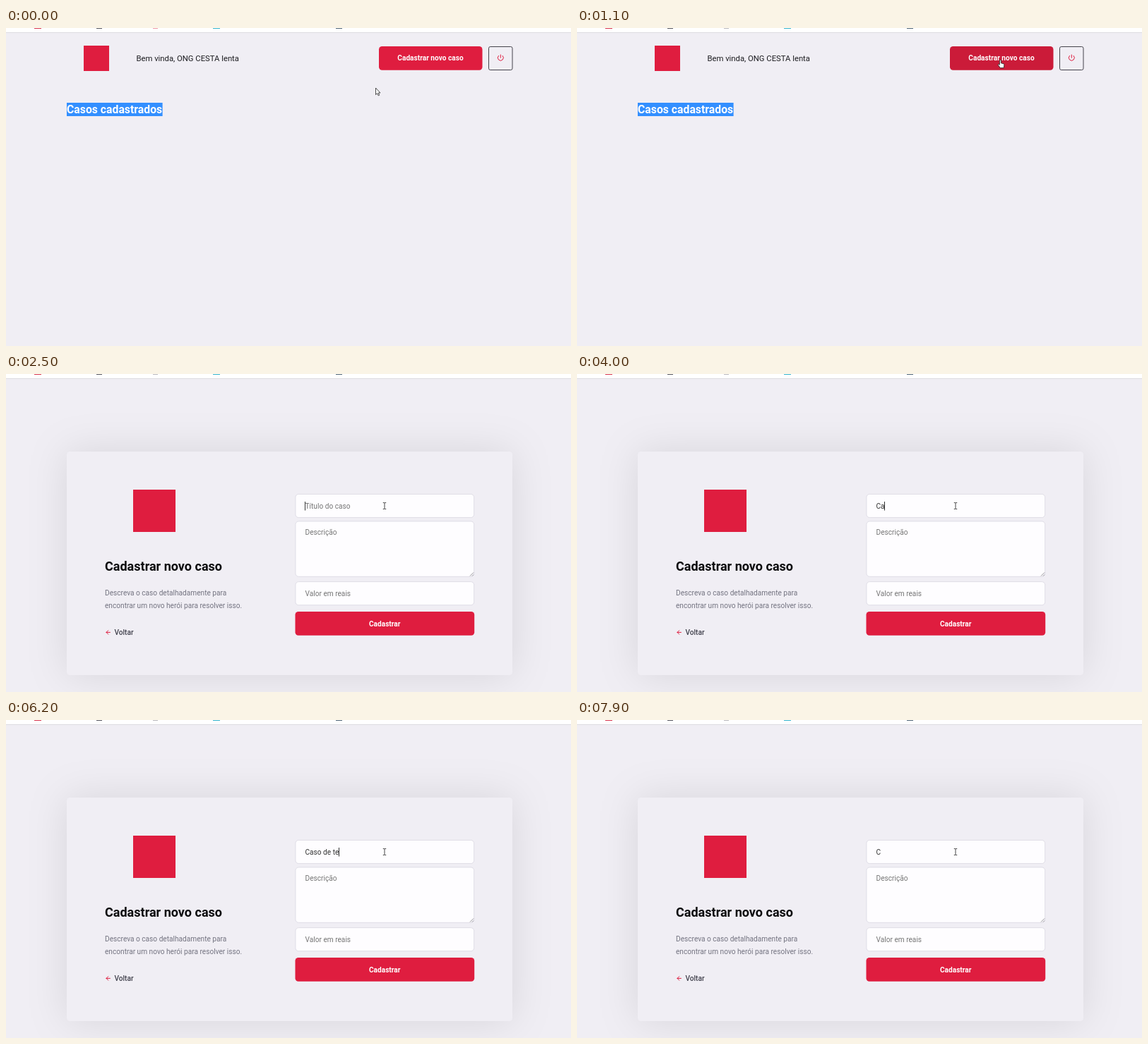
Write an HTML page that moves like this. It is 800 px wide and 451 px high and loops after 8 s.

```html
<!DOCTYPE html>
<html lang="pt-BR">
<head>
<meta charset="utf-8">
<title>Cadastrar novo caso</title>
<style>
  html, body { margin: 0; width: 100%; height: 100%; overflow: hidden; background: #f0eef4; }
  svg { display: block; width: 800px; height: 451px; }
  text { font: 10.14px Roboto, sans-serif; white-space: pre; }
  .card { filter: drop-shadow(0 0 28px rgba(0, 0, 0, .1)); }
  .field { fill: #fefdff; stroke: #dfdde6; }
  .hint { fill: #757575; }
  .muted { fill: #737380; }
  .bold { font-weight: 700; }
  .white { fill: #fff; }
  .mid { text-anchor: middle; }
  .brand { fill: #df1d3f; }
  .line { fill: none; stroke: #df1d3f; stroke-linecap: round; stroke-linejoin: round; }
  .pointer { fill: #fff; stroke: #222; stroke-width: .8; stroke-linejoin: round; }
</style>
</head>
<body>
<svg viewBox="0 0 800 451">
  <rect width="800" height="451" fill="#f0eef4"/>

  <g id="list">
    <rect class="brand" x="110" y="25" width="36" height="36"/>
    <text x="184.5" y="46.9" style="font-size:11.27px" fill="#1b1b1f">Bem vinda, ONG CESTA lenta</text>
    <rect id="create" x="528" y="26" width="146.5" height="33.8" rx="4.5"/>
    <text class="bold white mid" x="601" y="46.4">Cadastrar novo caso</text>
    <rect x="683.5" y="26.5" width="33.5" height="33" rx="2.3" fill="none" stroke="#44434c"/>
    <path class="line" d="M700.3 38v4.2M697.4 39.4a4 4 0 1 0 5.8 0"/>
    <rect x="86" y="106" width="135.6" height="19" fill="#338fff"/>
    <text class="bold white" x="86" y="121" style="font-size:15.78px">Casos cadastrados</text>
  </g>

  <g id="form">
    <rect x="86" y="110" width="631" height="317" rx="4.5" fill="#f0eef4"
      style="filter:none"/>
    <rect class="card" x="86" y="110" width="631" height="317" rx="4.5" fill="#f0eef4"/>
    <rect class="brand" x="180" y="164" width="60" height="60"/>
    <text class="bold" x="140" y="279" style="font-size:18.03px" fill="#0b0b0d">Cadastrar novo caso</text>
    <text class="muted" x="140" y="314">Descreva o caso detalhadamente para</text>
    <text class="muted" x="140" y="332">encontrar um novo herói para resolver isso.</text>
    <path class="line" d="M147.4 366.4h-5.4m2.7 -2.7l-2.7 2.7l2.7 2.7"/>
    <text x="153.4" y="370" style="font-weight:500" fill="#41414d">Voltar</text>

    <rect class="field" x="409.9" y="170.4" width="252.8" height="33.2" rx="4.5"/>
    <text id="title" x="423.5" y="190.6"></text>
    <rect id="caret" y="181" width="1" height="12.5" fill="#333"/>
    <rect class="field" x="409.9" y="208.9" width="252.8" height="78.4" rx="4.5"/>
    <text class="hint" x="423.5" y="228.4">Descrição</text>
    <path d="M657 286.5l5-5M660 286.5l2-2" stroke="#77757d" stroke-width=".8"/>
    <rect class="field" x="409.9" y="294.6" width="252.8" height="33.2" rx="4.5"/>
    <text class="hint" x="423.5" y="314.6">Valor em reais</text>
    <rect class="brand" x="409.5" y="337" width="253.7" height="33.8" rx="4.5"/>
    <text class="bold white mid" x="536.2" y="357.6">Cadastrar</text>
  </g>

  <!-- browser bar -->
  <rect width="800" height="6" fill="#fff"/>
  <rect y="6" width="800" height="1" fill="#dddce1"/>
  <rect x="40" width="10" height="1" fill="#d8364f"/>
  <rect x="128" width="8" height="1" fill="#55565f"/>
  <rect id="tab" x="208" width="7" height="1"/>
  <rect x="293" width="10" height="1" fill="#35b5cf"/>
  <rect x="467" width="9" height="1" fill="#4f6577"/>

  <g id="cursor">
    <path id="arrow" class="pointer" d="M.5 0v9.6l2.2-2 1.5 3.3 1.5-.7-1.5-3.2h2.8z"/>
    <path id="hand" class="pointer" d="M-.2 .8q1-1.2 2 0v4l3.6 .9q1 .3 .8 1.7l-.5 4.2h-5l-3.2-4.4q.2-1.2 1.4-.7l.9 .8z"/>
    <path id="beam" d="M-2.2 -4.5h1.6l.6 .5 .6-.5h1.6M0 -4v8M-2.2 4.5h1.6l.6-.5 .6 .5h1.6"
      fill="none" stroke="#333" stroke-width=".9"/>
  </g>
</svg>
<script>
const LOOP = 8000, OPEN = 1200, FOCUS = 1900, BLINK = 300;
const $ = id => document.getElementById(id);
const [list, form, create, title, caret, tab, cursor, arrow, hand, beam] =
  ['list', 'form', 'create', 'title', 'caret', 'tab', 'cursor', 'arrow', 'hand', 'beam'].map($);

// time, x, y
const path = [[100, 523, 85], [900, 598, 45], [1250, 599, 45], [1800, 536, 187]];
// time, number of letters typed
const phrase = 'Caso de te';
const keys = [[FOCUS, 0], [3700, 1], [3900, 2], [4100, 3], [4300, 4], [4400, 5], [4600, 6],
  [4800, 7], [5200, 8], [5700, 9], [6000, 10], [6400, 9], [6500, 8], [6700, 7], [6900, 6],
  [7100, 5], [7200, 4], [7300, 3], [7500, 2], [7600, 1]];

const clamp = v => Math.min(1, Math.max(0, v));
const smooth = v => v * v * (3 - 2 * v);
const show = (el, on) => { el.style.display = on ? '' : 'none'; };

function position(t) {
  let [, x, y] = path[0];
  for (let i = 1; i < path.length; i++) {
    const [t0, x0, y0] = path[i - 1], [t1, x1, y1] = path[i];
    if (t < t0) break;
    const p = smooth(clamp((t - t0) / (t1 - t0)));
    x = x0 + (x1 - x0) * p;
    y = y0 + (y1 - y0) * p;
  }
  return [x, y];
}

function render(t) {
  const opened = t >= OPEN;
  show(list, !opened);
  show(form, opened);
  tab.setAttribute('fill', t < 500 ? '#ee9aa8' : '#b9b8bd');

  const [x, y] = position(t);
  const over = !opened && x > 528 && y < 59.8;
  const inField = opened && y > 170;
  cursor.setAttribute('transform', `translate(${x} ${y})`);
  show(hand, over);
  show(beam, inField);
  show(arrow, !over && !inField);

  const h = clamp((t - 580) / 200);
  create.setAttribute('fill', `rgb(${223 - 20 * h},${29 - 2 * h},${63 - 6 * h})`);

  const [since, count] = keys.filter(k => k[0] <= t).pop() || [0, 0];
  title.textContent = count ? phrase.slice(0, count) : 'Título do caso';
  title.setAttribute('fill', count ? '#333' : '#757575');
  show(caret, t >= FOCUS && (t - since) % (2 * BLINK) < BLINK);
  const width = opened && count ? title.getSubStringLength(0, count) : 0;
  caret.setAttribute('x', Math.round(423.5 + width - .3));
}

let start;
function tick(now) {
  start ??= now;
  render((now - start) % LOOP);
  requestAnimationFrame(tick);
}
render(0);
requestAnimationFrame(tick);
</script>
</body>
</html>
```
